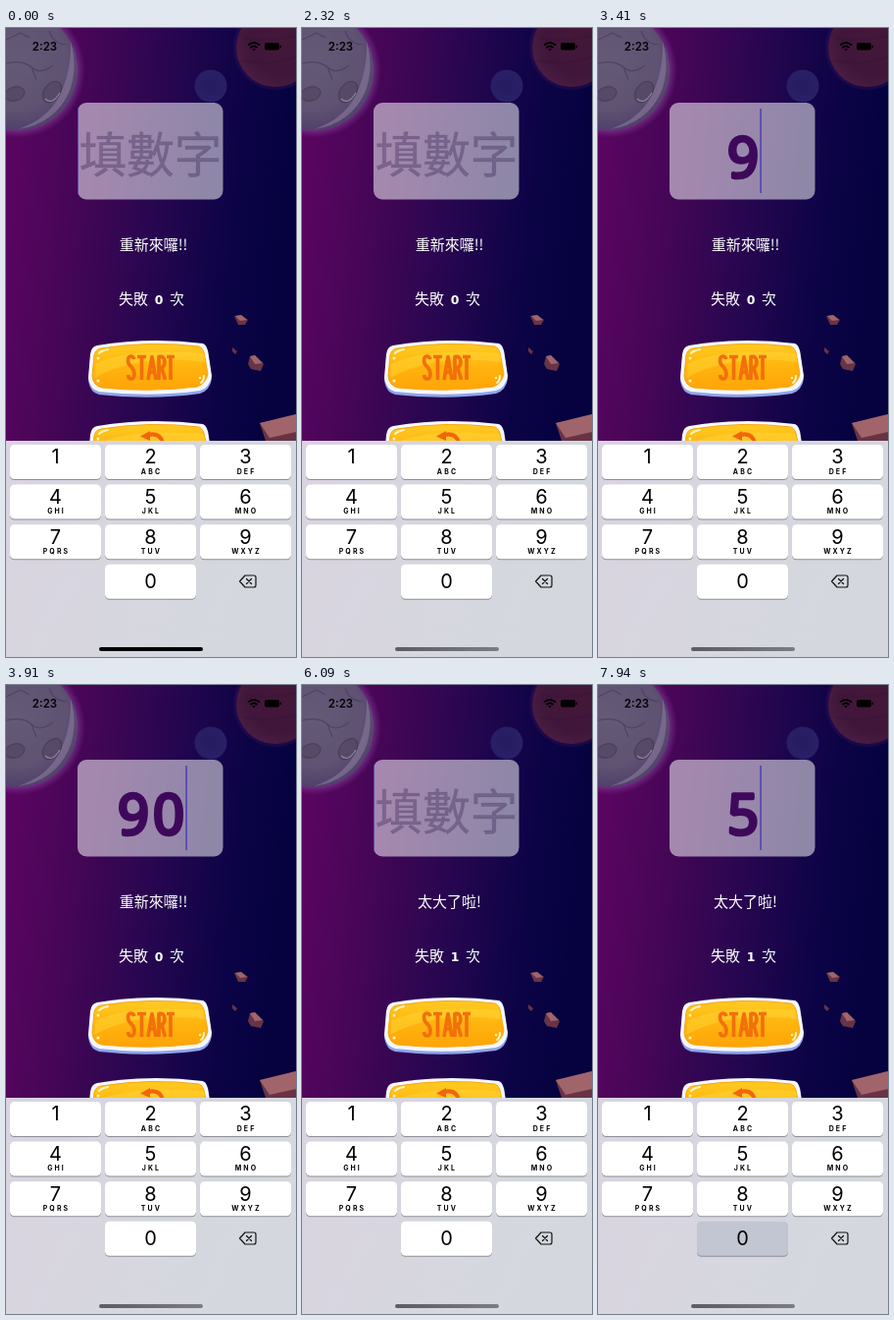
Animation, 296 px wide and 640 px high, one loop 8000 ms. Source, as an HTML page:

```html
<!DOCTYPE html>
<html lang="zh-Hant">
<head>
<meta charset="utf-8">
<title>猜數字</title>
<style>
html, body { margin: 0; width: 100%; height: 100%; overflow: hidden; background: #160644; }
svg { display: block; width: 100vw; height: 100vh; }
text { text-anchor: middle; }
.cjk { font-family: "Noto Sans CJK TC", "Noto Sans CJK", sans-serif; }
.label { font-size: 15px; font-weight: 500; fill: #fff; }
.hint { font-size: 48.5px; font-weight: 500; fill: #3d2a58; fill-opacity: .38; stroke: #3d2a58; stroke-opacity: .12; }
.count { font: 700 12.5px "DejaVu Sans", sans-serif; fill: #fff; }
.entry { font: 400 56px "Noto Sans", sans-serif; letter-spacing: 4px; fill: #3f095b; stroke: #3f095b; stroke-width: 3.6; stroke-linejoin: round; }
.digit { font: 400 20px Inter, sans-serif; }
.letters { font: 700 7px Inter, sans-serif; letter-spacing: 2.1px; }
.clock { font: 600 11.5px Inter, sans-serif; }
</style>
</head>
<body>
<svg viewBox="0 0 296 640" preserveAspectRatio="none">
  <defs>
    <linearGradient id="sky" gradientUnits="userSpaceOnUse" x1="0" y1="190" x2="290" y2="220">
      <stop offset="0" stop-color="#590560"/><stop offset=".25" stop-color="#440656"/>
      <stop offset=".55" stop-color="#24064f"/><stop offset=".8" stop-color="#0b0345"/><stop offset="1" stop-color="#05023f"/>
    </linearGradient>
    <radialGradient id="moon" cx=".5" cy=".42" r=".58">
      <stop offset="0" stop-color="#645a76"/><stop offset=".7" stop-color="#5f5272"/><stop offset="1" stop-color="#51406a"/>
    </radialGradient>
    <radialGradient id="halo">
      <stop offset=".88" stop-color="#8f5cab" stop-opacity=".45"/><stop offset="1" stop-color="#8a3f9c" stop-opacity="0"/>
    </radialGradient>
    <radialGradient id="mars" cx=".6" cy=".4" r=".65">
      <stop offset="0" stop-color="#451838"/><stop offset=".7" stop-color="#40163b"/><stop offset="1" stop-color="#4a1d42"/>
    </radialGradient>
    <radialGradient id="blue" cx=".5" cy=".45" r=".6">
      <stop offset="0" stop-color="#241c60"/><stop offset="1" stop-color="#2a2068"/>
    </radialGradient>
    <linearGradient id="gold" x2="0" y2="1">
      <stop offset="0" stop-color="#ffca22"/><stop offset=".5" stop-color="#ffb40e"/><stop offset="1" stop-color="#ffa408"/>
    </linearGradient>
    <linearGradient id="pad" x2="1" y2=".35">
      <stop offset="0" stop-color="#dad4e0"/><stop offset="1" stop-color="#d4d8de"/>
    </linearGradient>
    <linearGradient id="bar">
      <stop offset="0" stop-color="#5c5c62"/><stop offset="1" stop-color="#7c7c82"/>
    </linearGradient>
    <path id="shell" d="M93 323Q147 314 201 321Q206 323 207 334L210 354Q208 366 198 369Q147 376 95 370Q86 368 84 356L86 332Q87 324 93 323Z"/>
    <g id="button">
      <use href="#shell" y="3" fill="#8fa4e8"/>
      <use href="#shell" fill="#f5f7ff"/>
      <path d="M97 326Q147 318 197 324Q202 326 203 335L206 352Q204 362 195 365Q147 371 98 366Q89 364 88 354L90 333Q91 327 97 326Z" fill="url(#gold)" stroke="#f7a70c"/>
      <path d="M91 342Q125 325 202 331L203 340Q137 331 90 356Z" fill="#ffd838" opacity=".45"/>
      <path d="M95 331Q98 328 104 327M199 361Q202 359 202 354" fill="none" stroke="#fff6c2" stroke-width="2" stroke-linecap="round"/>
      <g fill="#fff3b0"><circle cx="94" cy="336" r="1.5"/><circle cx="94" cy="359" r="1.6"/><circle cx="198" cy="356" r="1.2"/></g>
    </g>
  </defs>

  <rect width="296" height="640" fill="url(#sky)"/>

  <circle cx="12" cy="43" r="69" fill="url(#halo)"/>
  <circle cx="12" cy="43" r="61" fill="url(#moon)"/>
  <path d="M12 103Q49 98 64 66Q74 42 66 14Q67 46 53 72Q40 94 12 103Z" fill="#8b7c9f" opacity=".6"/>
  <g fill="#544865" stroke="#473b59" stroke-width="1.3" opacity=".8">
    <ellipse cx="47" cy="65" rx="8" ry="12" transform="rotate(38 47 65)"/>
    <ellipse cx="9" cy="67" rx="10" ry="7" transform="rotate(-18 9 67)"/>
  </g>
  <path d="M0 36Q17 32 26 40T48 38M26 40L31 53M44 3Q48 16 62 17M0 12L15 5L24 10" fill="none" stroke="#4b3f5e" stroke-width="1.2" opacity=".8"/>
  <path d="M40 72Q47 79 55 66" fill="none" stroke="#9184a3" stroke-width="1.2"/>

  <circle cx="275" cy="20" r="43" fill="#5d245f" opacity=".2"/>
  <circle cx="275" cy="20" r="40" fill="url(#mars)"/>
  <path d="M242 33Q264 39 296 30M244 10Q266 15 296 8" fill="none" stroke="#351438" stroke-width="3" opacity=".4"/>
  <circle cx="209" cy="59" r="16.500" fill="url(#blue)"/>

  <g fill="#683347">
    <path d="M233 293L240 292L247 297L244 302L237 302Z"/>
    <path d="M249 334L254 333L263 342L260 349L250 347L247 342Z"/>
    <path d="M231 325L236 329L234 332L231 329Z"/>
    <path d="M259 402L296 393V420H265Z"/>
  </g>
  <g fill="#a0646a">
    <path d="M234 293L240 292L246 297L239 298Z"/>
    <path d="M249 334L254 333L262 341L254 342Z"/>
    <path d="M259 402L296 393V411L269 417Z"/>
  </g>

  <rect x="73" y="76" width="148.5" height="98.5" rx="9" fill="#fff" fill-opacity=".52"/>
  <text id="hint" class="cjk hint" x="147.5" y="147">填數字</text>
  <text id="entry" class="entry" x="150" y="152"></text>
  <rect id="caret" y="82" width="1.4" height="86" fill="#443bb4"/>

  <text id="message" class="cjk label" x="150.5" y="226"></text>
  <text class="cjk label" x="130" y="281">失敗</text>
  <text id="count" class="count" x="156" y="281"></text>
  <text class="cjk label" x="174.5" y="281">次</text>

  <use href="#button"/>
  <path aria-label="START" d="M131 337Q130 334 127.500 334Q124.500 334 124.500 338.500Q124.500 342 128 345Q131 348 131 352Q131 357 127.500 357Q125 357 124.500 353M134 334.500H143M138.500 334.500V358M145 358L149 334.500L153 358M146.500 350H151.500M156 358V334.500Q162 333.500 162 340Q162 346 156 346M159 346L162.500 358M164 334.500H172M168 334.500V358" fill="none" stroke="#f2700c" stroke-width="3.7" stroke-linejoin="round"/>
  <use href="#button" y="82"/>
  <path d="M145 414Q157 411 160 422" fill="none" stroke="#f2650d" stroke-width="4"/>
  <path d="M137 415.500L147 410V420Z" fill="#f2650d"/>

  <rect y="420" width="296" height="220" fill="url(#pad)"/>
  <g id="keys"></g>
  <g fill="none" stroke="#111" stroke-width="1.2" stroke-linejoin="round" stroke-linecap="round">
    <path d="M244 557H253Q255 557 255 559V567Q255 569 253 569H244L238.500 563Z"/>
    <path d="M245.500 560.500L250.500 565.500M250.500 560.500L245.500 565.500"/>
  </g>
  <rect id="home" x="95" y="630" width="106" height="4" rx="2"/>

  <text class="clock" x="39.5" y="23">2:23</text>
  <g fill="none" stroke="#000" stroke-width="1.8">
    <path d="M247 17.500Q253 12.500 259 17.500M249.500 20Q253 17 256.500 20"/>
    <path d="M251.500 21.500H254.500L253 23Z" fill="#000" stroke-width=".5"/>
  </g>
  <rect x="264" y="15" width="15" height="7.500" rx="2"/>
  <rect x="279.700" y="17.300" width="1.200" height="3" rx=".6"/>
</svg>
<script>
const LOOP = 8000;
const FADE = 120;
const $ = id => document.getElementById(id);

// Caret pauses: start, end and length of the fade back in
const pauses = [
  [360, 660, 0], [1190, 1660, FADE], [2200, 2680, FADE],
  [4190, 4660, FADE], [5620, 6090, FADE], [6630, 7110, FADE]
];
const presses = [[3170, 3410, '9'], [3680, 3910, '0'], [7460, 7690, '5'], [7940, LOOP, '0']];
const entries = [[0, ''], [3410, '9'], [3910, '90'], [5090, ''], [7690, '5']];
const GUESS_AT = 5090;

const letters = ['', 'ABC', 'DEF', 'GHI', 'JKL', 'MNO', 'PQRS', 'TUV', 'WXYZ'];
const keys = {};

function add(parent, tag, attrs, text = '') {
  const node = document.createElementNS('http://www.w3.org/2000/svg', tag);
  for (const name in attrs) node.setAttribute(name, attrs[name]);
  node.textContent = text;
  return parent.appendChild(node);
}

function addKey(digit, col, row, sub) {
  const x = 4 + col * 97, y = 424 + row * 40.6, mid = x + 46.5;
  const box = { x, width: 93, height: 35, rx: 4.5 };
  add($('keys'), 'rect', { ...box, y: y + 1, fill: '#8d8e96' });
  keys[digit] = add($('keys'), 'rect', { ...box, y });
  add($('keys'), 'text', { class: 'digit', x: mid, y: y + (digit === '0' ? 24.5 : 19.4) }, digit);
  if (sub) add($('keys'), 'text', { class: 'letters', x: mid + 1, y: y + 29.6 }, sub);
}

letters.forEach((sub, i) => addKey(String(i + 1), i % 3, Math.floor(i / 3), sub));
addKey('0', 1, 3);

function caretOpacity(t) {
  const pause = pauses.find(([from, to]) => t >= from && t < to);
  if (!pause) return 1;
  const [from, to, fadeIn] = pause;
  return t - from < 110 || to - t <= fadeIn ? .5 : 0;
}

function draw(t) {
  const entry = entries.filter(([at]) => at <= t).pop()[1];
  const pressed = presses.find(([from, to]) => t >= from && t < to);
  const guessed = t >= GUESS_AT;

  $('hint').style.display = entry ? 'none' : '';
  $('entry').textContent = entry;
  // An empty field clips most of the caret at its left edge
  $('caret').setAttribute('x', entry ? 147.4 + entry.length * 18 : 73);
  $('caret').setAttribute('width', entry ? 1.4 : .8);
  $('caret').setAttribute('opacity', caretOpacity(t));
  $('message').textContent = guessed ? '太大了啦!' : '重新來囉!!';
  $('count').textContent = guessed ? '1' : '0';
  $('home').setAttribute('fill', t < 120 ? '#000' : 'url(#bar)');
  for (const digit in keys) {
    keys[digit].setAttribute('fill', pressed && pressed[2] === digit ? '#c1c6d2' : '#fff');
  }
}

const start = performance.now();
function tick() {
  draw((performance.now() - start) % LOOP);
  requestAnimationFrame(tick);
}
tick();
</script>
</body>
</html>
```
